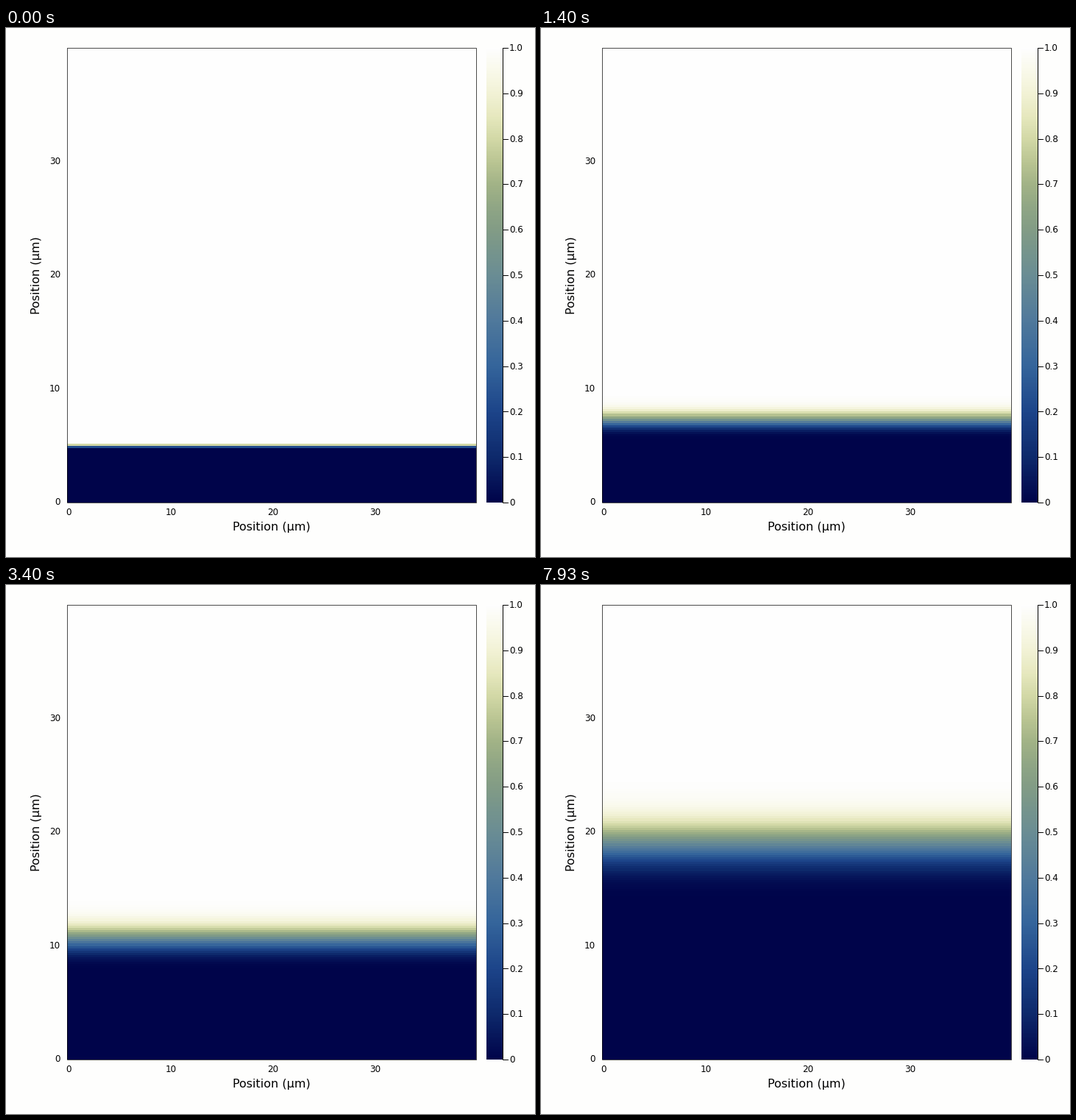
Write a matplotlib script that moves like this. It is 719x719 px and loops after 8000 ms.

```python
import numpy as np
import matplotlib.pyplot as plt
from matplotlib.animation import FuncAnimation
from matplotlib.colors import LinearSegmentedColormap

SIZE, DPI = 719, 64
FRAMES, LOOP_MS = 120, 8000
CELLS, FRONT, SUBSTEPS = 200, 25, 40
LEFT, RIGHT, TOP, BOTTOM = 83.5, 639.5, 27.5, 645.5
INK = "#000000"

plt.rcParams["font.family"] = "DejaVu Sans"

STOPS = [
    (0.00, "#00044a"), (0.10, "#0e2a6c"), (0.20, "#1d458a"),
    (0.30, "#35659b"), (0.40, "#50799c"), (0.50, "#6a8d94"),
    (0.60, "#829c86"), (0.65, "#90a685"), (0.70, "#a2b387"),
    (0.75, "#bac593"), (0.80, "#d2d8a6"), (0.85, "#e6e8be"),
    (0.90, "#f2f2d5"), (0.95, "#f9f9ea"), (1.00, "#fefefe"),
]
cmap = LinearSegmentedColormap.from_list("depth", STOPS, N=256)


def px(n):
    """Pixels to points."""
    return n * 72 / DPI


fig = plt.figure(figsize=(SIZE / DPI, SIZE / DPI), dpi=DPI, facecolor="#fefefd")
ax = fig.add_axes([0, 0, 1, 1])


def line(xs, ys, alpha=1):
    ax.plot(xs, ys, color=INK, alpha=alpha, lw=px(1), snap=False,
            solid_capstyle="butt", solid_joinstyle="miter", zorder=3)


def label(x, y, text, size=12, **kw):
    kw = {"ha": "center", "va": "baseline", **kw}
    ax.text(x, y, text, fontsize=px(size), color=INK, **kw)


def strip(data, x0, x1):
    return ax.imshow(data, cmap=cmap, vmin=0, vmax=1, origin="lower",
                     extent=[x0, x1, BOTTOM - 0.5, TOP - 0.5], aspect="auto",
                     interpolation="nearest")


def advect():
    """Upwind advection of a step; the speed grows slightly with height."""
    u = np.ones(CELLS)
    u[:FRONT - 1] = 0
    u[FRONT - 1:FRONT + 1] = 0.22, 0.8
    speed = (0.53 + 0.002 * (np.arange(CELLS) - FRONT)) / SUBSTEPS
    profiles = [u.copy()]
    for _ in range(FRAMES - 1):
        for _ in range(SUBSTEPS):
            u -= speed * np.diff(u, prepend=0)
        profiles.append(u.copy())
    return profiles


profiles = advect()
field = strip(profiles[0][:, None], LEFT - 0.5, RIGHT - 0.5)
strip(np.linspace(0, 1, 256)[:, None], 653, 675)

# Frame, ticks and labels
line([LEFT, RIGHT, RIGHT, LEFT, LEFT], [TOP, TOP, BOTTOM, BOTTOM, TOP], 0.7)
for k in range(4):
    label(85 + 139 * k, 662, str(10 * k))
    label(74, 648.4 - 154.5 * k, str(10 * k), ha="right")

line([675.5, 675.5], [TOP - 0.5, BOTTOM + 0.5])
for k in range(11):
    y = BOTTOM + (TOP - BOTTOM) * k / 10
    line([675, 683], [int(y) + 0.5] * 2)
    label(684, y + 3.6, f"{k / 10:.1f}" if k else "0", ha="left")

label(361.3, 683, "Position (µm)", 16)
label(46, 336.5, "Position (µm)", 16, rotation=90, rotation_mode="anchor")

ax.set_xlim(0, SIZE)
ax.set_ylim(SIZE, 0)
ax.axis("off")


def update(i):
    field.set_data(profiles[i][:, None])
    return (field,)


anim = FuncAnimation(fig, update, frames=FRAMES, interval=LOOP_MS / FRAMES,
                     init_func=lambda: update(0), repeat=True, repeat_delay=0)
plt.show()
```
